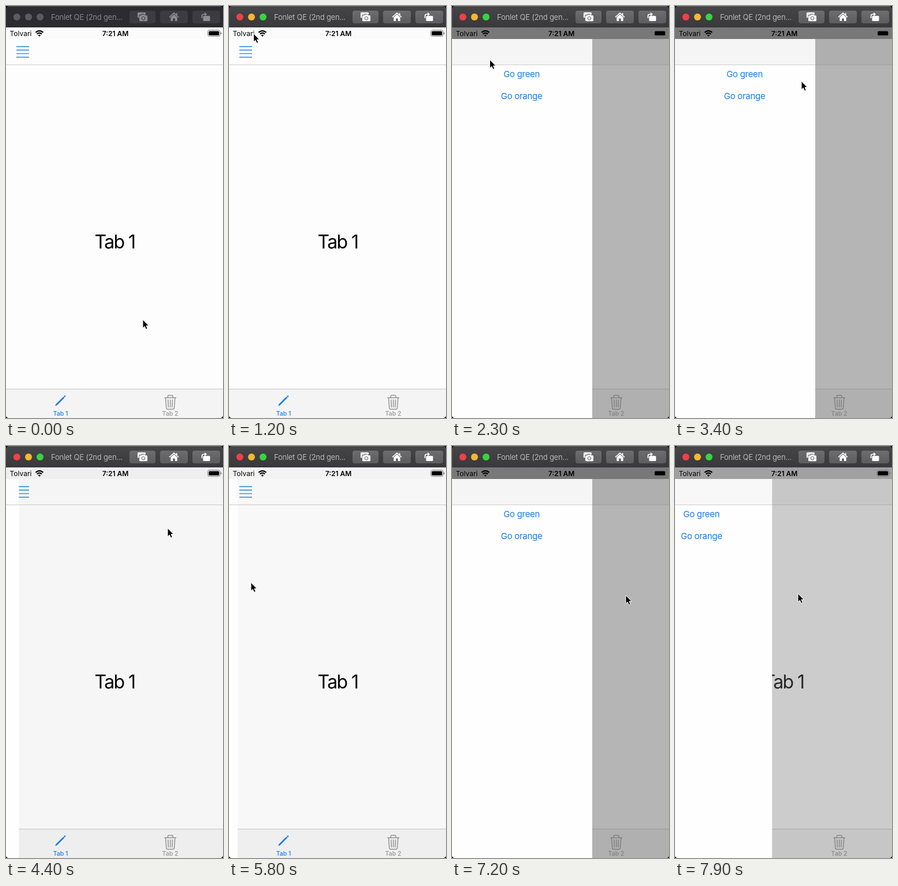
Write an HTML page that moves like this. It is 376 by 712 pixels and loops after 8 s.

```html
<!DOCTYPE html>
<html lang="en">
<head>
<meta charset="utf-8">
<title>Side menu demo</title>
<style>
  html, body { margin: 0; width: 100%; height: 100%; overflow: hidden; background: #000; }
  svg { display: block; width: 100vw; height: 100vh; font-family: Inter, "Liberation Sans", sans-serif; }
  .mid { text-anchor: middle; }
  .title { font-size: 13px; letter-spacing: -.25px; }
  .status { font-size: 12px; }
  .tab { font-size: 10.5px; font-weight: 500; }
  .big { font-size: 32px; letter-spacing: -1.6px; }
  .link { font-size: 15px; letter-spacing: -.3px; fill: #1a7bea; }
</style>
</head>
<body>
<svg viewBox="0 0 376 712" xmlns="http://www.w3.org/2000/svg">
  <defs>
    <clipPath id="window"><rect width="376" height="712" rx="5"/></clipPath>
    <linearGradient id="chrome" x2="0" y2="1">
      <stop stop-color="#464548"/><stop offset="1" stop-color="#39383b"/>
    </linearGradient>
    <linearGradient id="button" x2="0" y2="1">
      <stop stop-color="#6d6c6f"/><stop offset="1" stop-color="#5d5c5f"/>
    </linearGradient>
  </defs>
  <g clip-path="url(#window)">
    <!-- app -->
    <rect y="37" width="376" height="675" fill="#fdfdfd"/>
    <rect y="101" width="376" height="1.2" fill="#d3d3d4"/>
    <path d="M18 70.200h22M18 76.300h22M18 82.400h22M18 88.500h22" stroke="#2184df" stroke-width="1.4"/>
    <text class="big" x="153.5" y="419">Tab 1</text>
    <rect y="662" width="376" height="50" fill="#f4f4f4"/>
    <rect y="661.5" width="376" height="1" fill="#c5c5c6"/>
    <g fill="#1b7bea">
      <path d="M85.200 691.300l1.200-3.200L99.400 675.200l1.900 1.900-13 13zM100.100 674.500l1.200-1.200q.9-.7 1.700.1t.1 1.700l-1.100 1.300z"/>
      <text class="tab mid" x="94.5" y="708">Tab 1</text>
    </g>
    <g fill="none" stroke="#969697" stroke-width="1.5" stroke-linecap="round" stroke-linejoin="round">
      <path d="M274.8 677h19.8M280.3 676.5v-2q0-1.8 1.8-1.8h5.2q1.8 0 1.8 1.8v2M276.6 677.5l1.2 17q.2 2.3 2.4 2.3h9q2.2 0 2.4-2.3l1.2-17M280.9 680.8l.5 12.4M284.7 680.8v12.4M288.5 680.8l-.5 12.4"/>
      <text class="tab mid" x="284.5" y="708" fill="#969697" stroke="none">Tab 2</text>
    </g>
    <rect id="dim" y="57" width="376" height="655" fill="#6e6e6e"/>

    <!-- side menu, right edge at x = 0 -->
    <g id="menu">
      <rect x="-250" y="57" width="250" height="655" fill="#fefefe"/>
      <rect x="-250" y="101" width="250" height="1.2" fill="#d3d3d4"/>
      <text class="link mid" x="-122.4" y="122.5">Go green</text>
      <text class="link mid" x="-122.4" y="161">Go orange</text>
    </g>
    <rect id="navDim" y="57" width="376" height="44"/>

    <!-- status bar -->
    <rect y="37" width="376" height="20" fill="#fbfbfb"/>
    <rect id="statusDim" y="37" width="376" height="20"/>
    <text class="status" x="6.5" y="51.7">Tolvari</text>
    <g fill="none" stroke="#000" stroke-width="2.2">
      <path d="M51.3 45.8q6.6-6 13.2 0M53.7 48.5q4.2-3.6 8.4 0"/>
      <path d="M57.9 53l-2.3-2.5q2.3-1.8 4.6 0z" fill="#000" stroke="none"/>
    </g>
    <text class="status mid" x="189.5" y="51.7" font-weight="600">7:21 AM</text>
    <rect x="349.5" y="41.8" width="21.5" height="10.6" rx="3" fill="none" stroke="#777" stroke-width="1"/>
    <rect x="351.2" y="43.4" width="18.1" height="7.4" rx="1.6"/>
    <path d="M372 45.2q1.6.6 1.6 1.9t-1.6 1.9z" fill="#777"/>

    <!-- window chrome -->
    <rect id="bar" width="376" height="37"/>
    <rect width="376" height=".8" fill="#fff" opacity=".2"/>
    <g id="lights">
      <circle cx="18.8" cy="19" r="6"/><circle cx="39" cy="19" r="6"/><circle cx="59" cy="19" r="6"/>
    </g>
    <text id="name" class="title" x="78" y="24">Fonlet QE (2nd gen...</text>
    <g id="buttons">
      <rect x="214" y="8" width="45" height="22" rx="4"/>
      <rect x="267" y="8" width="48" height="22" rx="4"/>
      <rect x="323" y="8" width="48" height="22" rx="4"/>
    </g>
    <g id="glyphs">
      <path d="M229.5 11h11q1.5 0 1.5 1.5v2h-2l-1-1h-4l-1 1.5h-2q-1.8 0-1.8 1.8v3.7h-.7q-1.5 0-1.5-1.5v-6.5q0-1.5 1.5-1.5z"/>
      <path fill-rule="evenodd" d="M232.5 16.3h2l1.2-1.5h4.6l1.2 1.5h2q1.5 0 1.5 1.5v7q0 1.5-1.5 1.5h-11q-1.5 0-1.5-1.5v-7q0-1.5 1.5-1.5zM238 17.9a3.3 3.3 0 1 0 .01 0zM238 19a2.2 2.2 0 1 1-.01 0z"/>
      <path d="M291 11l3.6 3.3V12.2h2v4l2.9 2.6-1 1.1L291 13.2l-7.5 6.7-1-1.1z"/>
      <path d="M291 14.6l5.6 5v6.4h-3.8v-4.6h-3.6v4.6h-3.8v-6.4z"/>
      <rect x="341.5" y="17" width="12" height="9" rx="1.5"/>
      <path d="M338.7 21v-3.5q0-4 4-4h1.5V11l4 3.3-4 3.3v-2.5h-1.4q-2.4 0-2.4 2.4V21z"/>
    </g>
  </g>
  <path id="cursor" d="M0 0V14.6L3.3 11.6 5.6 16.7 8.2 15.6 6 10.5H10.300Z" stroke="#fff" stroke-width="1" stroke-linejoin="round"/>
</svg>
<script>
const LOOP = 8000, STEP = 100, MENU = 243;
const $ = id => document.getElementById(id);
const clamp = (v, lo, hi) => Math.min(hi, Math.max(lo, v));
const easeOut = t => 1 - (1 - t) ** 2;
const phase = (t, from, to) => easeOut(clamp((t - from) / (to - from), 0, 1));

// pointer stops: time, x, y
const path = [
  [0, 237, 542], [900, 47, 13], [1000, 47, 13], [1400, 38, 82],
  [1800, 38, 82], [2400, 71, 95], [2600, 71, 95], [2800, 72, 97],
  [2900, 72, 97], [3100, 98, 103], [3400, 219, 130], [3600, 280, 142],
  [4400, 280, 142], [5100, 86, 235], [5300, 20, 236], [5400, 20, 236],
  [5800, 38, 236], [6400, 208, 248], [6600, 270, 252], [6700, 288, 254],
  [6900, 288, 254], [7200, 301, 258], [7300, 301, 258], [7900, 213, 255]
];

function pointer(t) {
  const i = path.findIndex(p => p[0] > t);
  if (i < 0) return path[path.length - 1].slice(1);
  const [t0, x0, y0] = path[i - 1], [t1, x1, y1] = path[i];
  const k = (t - t0) / (t1 - t0);
  return [x0 + (x1 - x0) * k, y0 + (y1 - y0) * k];
}

function menuWidth(t, x) {
  if (t < 4200) return MENU * phase(t, 1508, 1900);
  if (t < 5400) return MENU * (1 - phase(t, 4200, 4487));
  if (t < 6700) return clamp((x - 22) * .93, 0, MENU);
  if (t < 7300) return MENU;
  return MENU - (301 - x) * .85;
}

function chrome(active) {
  $('bar').setAttribute('fill', active ? 'url(#chrome)' : '#2c2b2f');
  $('name').setAttribute('fill', active ? '#b5b4b6' : '#858487');
  $('buttons').setAttribute('fill', active ? 'url(#button)' : '#3c3b3f');
  $('glyphs').setAttribute('fill', active ? '#fff' : '#8d8c8f');
  const colors = active ? ['#f23f48', '#f5b72e', '#34d53f'] : Array(3).fill('#5c5b5e');
  [...$('lights').children].forEach((dot, i) => dot.setAttribute('fill', colors[i]));
}

function draw(t) {
  const [x, y] = pointer(t), w = menuWidth(t, x), open = w / MENU;
  chrome(t >= 1000);
  $('menu').setAttribute('transform', `translate(${w} 0)`);
  $('dim').setAttribute('opacity', .5 * open);
  $('navDim').setAttribute('opacity', .035 * open);
  $('statusDim').setAttribute('opacity', .52 * open);
  $('cursor').setAttribute('transform', `translate(${x} ${y})`);
}

function tick() {
  const t = performance.now() % LOOP;
  draw(Math.floor(t / STEP) * STEP);
  requestAnimationFrame(tick);
}
tick();
</script>
</body>
</html>
```
